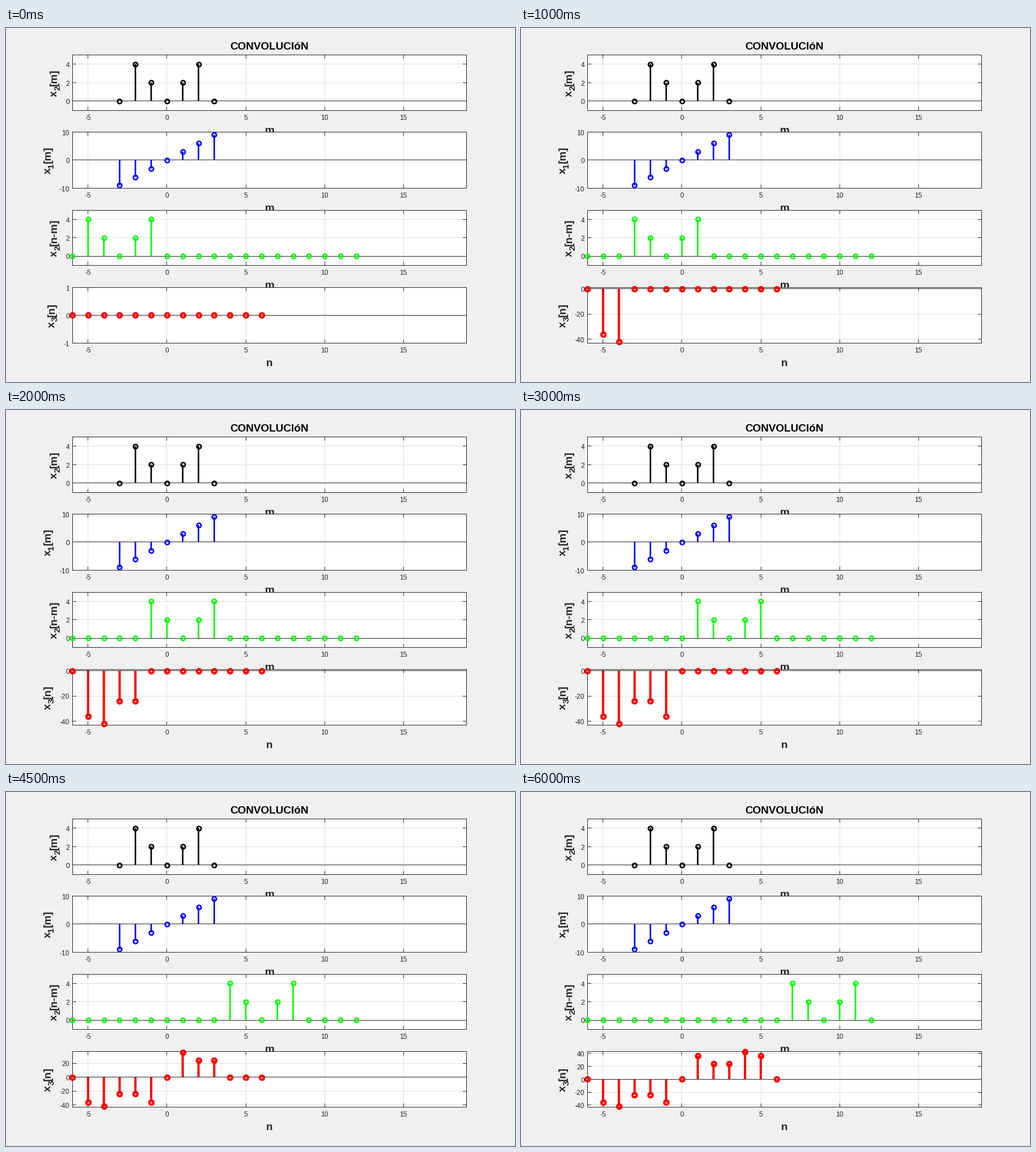
Animation, 898 px wide and 624 px high, one loop 6500 ms. Source, as a matplotlib script:

```python
import math

import numpy as np
import matplotlib.pyplot as plt
from matplotlib.animation import FuncAnimation
from matplotlib.patches import Rectangle

W, H, DPI = 898, 624, 64
PT = 72 / DPI  # points per pixel
LEFT, RIGHT = 117.0, 812.6
MID = (LEFT + RIGHT) / 2
X_MIN, X_MAX = -6, 19
TOPS = (47.3, 183.3, 321.3, 457.3)
BOTTOMS = (145.3, 282.3, 418.3, 555.3)
INK, GRID, BACK = "#262626", "#dfdfdf", "#f0f0f0"
TICK_PX, LABEL_PX, SUB = 12, 19, 0.8
MARKER_PX, TICK_LEN = 7.5, 6
ADVANCE = {"-": 0.333, "[": 0.333, "]": 0.333, "m": 0.889, "n": 0.611}

m = np.arange(-3, 4)
x1 = 3 * m
x2 = np.array([0, 4, 2, 0, 2, 4, 0])
n = np.arange(-6, 7)
x3 = np.convolve(x1, x2)
shift_m = np.arange(-6, 13)

plt.rcParams["font.family"] = "Liberation Sans"
fig = plt.figure(figsize=(W / DPI, H / DPI), dpi=DPI, facecolor=BACK)
ax = fig.add_axes([0, 0, 1, 1])


def width(text):
    """Advance width in em."""
    return sum(ADVANCE.get(c, 0.556) for c in text)


def px(v):
    return LEFT + (v - X_MIN) * (RIGHT - LEFT) / (X_MAX - X_MIN)


def hairline(xs, ys, color=INK, z=4):
    """One-pixel line laid on pixel centres."""
    ax.plot(np.floor(xs) + 0.5, np.floor(ys) + 0.5, color=color, lw=PT,
            zorder=z, snap=False, solid_capstyle="projecting")


def label(x, y, text, size, color=INK, z=6, **kw):
    ax.text(x, y, text, fontsize=size * PT, color=color, zorder=z,
            va="baseline", **kw)


def side_label(x, y, sub, rest):
    """Upright-turned 'x' with a subscript, centred on y."""
    parts = (("x", LABEL_PX, 0), (sub, LABEL_PX * SUB, 5), (rest, LABEL_PX, 0))
    y += sum(width(t) * s for t, s, _ in parts) / 2
    for text, size, drop in parts:
        label(x + drop, y, text, size, weight="bold", rotation=90,
              rotation_mode="anchor", ha="left")
        y -= width(text) * size


def panel(row, lo, hi, step, xs, ys, color, lw, sub, rest, xlabel):
    top, bottom = TOPS[row], BOTTOMS[row]

    def py(v):
        return bottom - (v - lo) * (bottom - top) / (hi - lo)

    ax.add_patch(Rectangle((LEFT, top), RIGHT - LEFT, bottom - top,
                           fc="white", ec="none", zorder=1))
    for v in range(-5, 16, 5):
        x = px(v)
        hairline((x, x), (top, bottom), GRID, z=2)
        hairline((x, x), (top, top + TICK_LEN))
        hairline((x, x), (bottom - TICK_LEN, bottom))
        label(x, bottom + 17, str(v), TICK_PX, ha="center")

    ticks = range(math.ceil(lo / step) * step, hi + 1, step)
    for v in ticks:
        y = py(v)
        hairline((LEFT, RIGHT), (y, y), GRID, z=2)
        hairline((LEFT, LEFT + TICK_LEN), (y, y))
        hairline((RIGHT - TICK_LEN, RIGHT), (y, y))
        label(112, y + 5.3, str(v), TICK_PX, ha="right")

    for y in (top, py(0), bottom):
        hairline((LEFT, RIGHT), (y, y))
    for x in (LEFT, RIGHT):
        hairline((x, x), (top, bottom))

    for x, v in zip(xs, ys):
        if v:
            ax.plot((px(x), px(x)), (py(0), py(v)), color=color, lw=lw * PT,
                    zorder=3, snap=False, solid_capstyle="butt")
    ax.plot(px(xs), py(ys), "o", ms=MARKER_PX * PT, mfc="none", mec=color,
            mew=lw * PT, zorder=5, snap=False)

    # The next panel's background may cover the lower edge of this label.
    label(MID, bottom + 40.5, xlabel, LABEL_PX, z=0, weight="bold",
          ha="center")
    widest = max(width(str(v)) for v in ticks) * TICK_PX
    side_label(96.7 - widest, (top + bottom) / 2, sub, rest)


def update(k):
    ax.clear()
    ax.set(xlim=(0, W), ylim=(H, 0))
    ax.axis("off")
    label(MID, 38.5, "CONVOLUCIóN", LABEL_PX, "black", weight="bold",
          ha="center")

    shifted = np.zeros(len(shift_m), int)
    shifted[k:k + len(x2)] = x2
    done = np.where(n <= k - 6, x3, 0)
    lo, hi = int(done.min()) - 1, int(done.max()) + 1
    step = 1 if hi - lo <= 2 else 10 if hi - lo < 40 else 20

    thin, thick = 8 / 3, 4
    panel(0, -1, 5, 2, m, x2, "#000000", thin, "2", "[m]", "m")
    panel(1, -10, 10, 10, m, x1, "#0000ff", thin, "1", "[m]", "m")
    panel(2, -1, 5, 2, shift_m, shifted, "#00ff00", thin, "2", "[n-m]", "m")
    panel(3, lo, hi, step, n, done, "#ff0000", thick, "3", "[n]", "n")


anim = FuncAnimation(fig, update, frames=13, interval=500, repeat=True)
plt.show()
```
